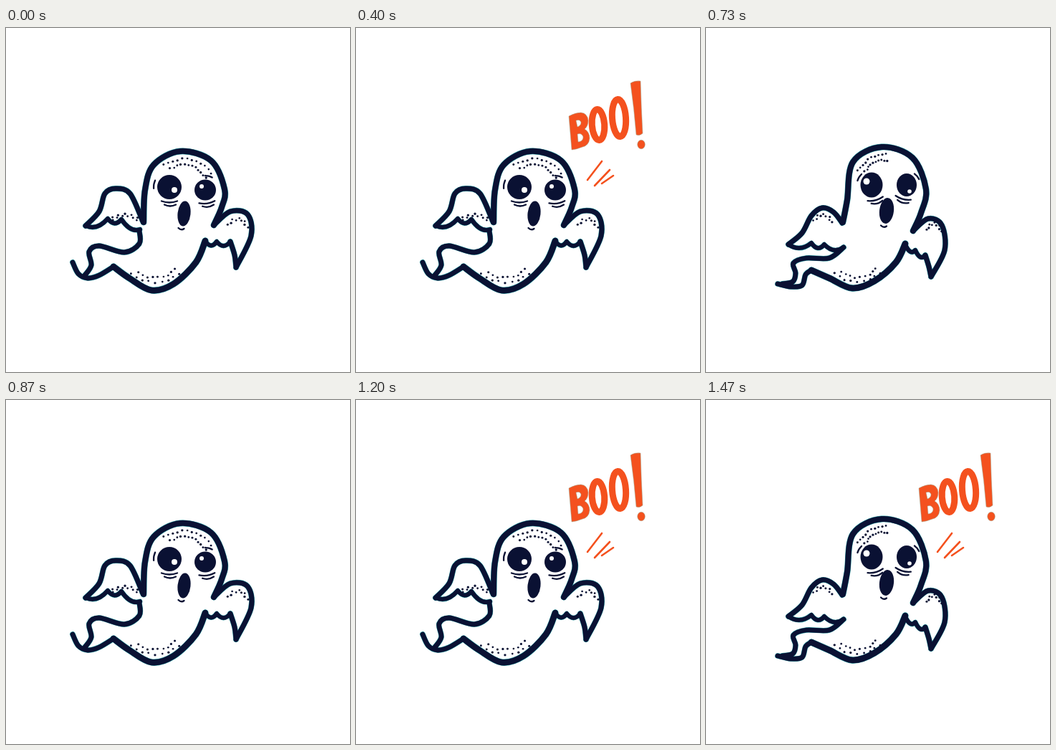
Animation, 480 px wide and 480 px high, one loop 1790 ms. Source, as an HTML page:

```html
<!DOCTYPE html>
<html lang="en">
<head>
<meta charset="utf-8">
<title>Boo</title>
<style>
  html, body { margin: 0; width: 100%; height: 100%; overflow: hidden; background: #fff; }
  svg { display: block; width: 100vw; height: 100vh; }
</style>
</head>
<body>
<svg id="stage" viewBox="0 0 480 480">
  <g id="boo" fill="#f4511e" fill-rule="evenodd" stroke="#9aa68e" stroke-width=".5" role="img" aria-label="BOO!">
    <path d="M297 123Q306 118 314 118Q323 119 324 129Q324 137 319 141Q326 145 326 154Q325 164 316 166Q309 169 301 170Z
             M307 129L309 138Q314 136 314 132Q313 127 307 129Z M309 148L310 159Q317 158 317 152Q315 146 309 148Z"/>
    <path d="M383 77Q389 73 397 74Q398 112 400 147Q396 151 391 149Q388 112 383 77Z"/>
    <ellipse cx="398" cy="162.5" rx="5.3" ry="6.2"/>
    <g fill="none" stroke="#f4511e">
      <ellipse cx="338" cy="135" rx="8.7" ry="21.5" stroke-width="9" transform="rotate(-4 338 135)"/>
      <ellipse cx="367" cy="125.5" rx="9.5" ry="26" stroke-width="9" transform="rotate(-4 367 125.5)"/>
      <path d="M343 186L323 212M354 198L333 220M359 206L343 217" stroke-width="2.6" stroke-linecap="round"/>
    </g>
  </g>
</svg>
<script>
const NS = 'http://www.w3.org/2000/svg';
const LOOP = 1790, TICK = 200 / 3;
const INK = '#0a1133', FRINGE = '#27a3a8';
const stage = document.getElementById('stage');

function add(parent, tag, attrs) {
  const el = document.createElementNS(NS, tag);
  for (const k in attrs) el.setAttribute(k, attrs[k]);
  return parent.appendChild(el);
}

const points = text => text.split(' ').map(p => p.split(',').map(Number));
const polar = (cx, cy, rx, ry, deg) => {
  const a = deg * Math.PI / 180;
  return [cx + rx * Math.cos(a), cy + ry * Math.sin(a)];
};

function randomFrom(seed) {
  return () => (seed = (seed * 16807) % 2147483647) / 2147483647;
}

// Smooth curve through key points; "|" marks a sharp corner.
function curve(text) {
  return text.split('|').map(part => {
    const p = points(part);
    let d = 'M' + p[0];
    for (let i = 0; i + 1 < p.length; i++) {
      const a = p[i - 1] || p[i], b = p[i], c = p[i + 1], e = p[i + 2] || c;
      const h1 = b.map((v, k) => v + (c[k] - a[k]) / 6);
      const h2 = c.map((v, k) => v - (e[k] - b[k]) / 6);
      d += `C${h1} ${h2} ${c}`;
    }
    return d;
  }).join('');
}

// Ragged wing hem: one sagging lobe between each pair of cusps.
function hem(text, sag) {
  const p = points(text);
  return p.slice(1).reduce((d, [x, y], i) =>
    `${d}Q${(p[i][0] + x) / 2} ${(p[i][1] + y) / 2 + 2 * sag} ${x} ${y}`, 'M' + p[0]);
}

const poses = [
  {
    head: '192,271 194,226 206,191 243,172 286,185 305,225 301,250 290,275',
    belly: '278,297 265,327 234,357 203,366 172,349 150,333',
    tail: '150,333 130,345 114,349 101,343 93,327|110,345 119,331 116,312 130,304 165,313 186,301 186,283',
    wings: '111,276 130,256 138,231 153,224 173,231 191,270|290,275 313,256 337,260 342,290 321,334|321,334 319,317 313,298',
    hems: ['187,281 161,267 142,266 112,276', '313,298 294,298 278,297'],
    eyes: [
      { x: 228, y: 222, rx: 17, ry: 17, glint: [235, 226, 4], tilt: 0, brow: 190 },
      { x: 278, y: 226, rx: 15, ry: 14.5, glint: [273, 221, 3], tilt: -8, brow: 284 }
    ],
    mouth: [248.5, 259, 9, 17.5, 6],
    stipple: { head: [248, 222, 44, 41, 230, 335, 24], left: [166, 272, 24, 13, 190, 345, 13],
               right: [323, 280, 15, 16, 200, 350, 9], belly: [208, 325, 42, 31, 145, 30, 18] }
  },
  {
    head: '191,271 197,240 205,187 245,166 288,181 307,225 300,258 289,283',
    belly: '278,301 265,327 235,353 204,363 172,349 147,338',
    tail: '147,338 139,344 134,359 118,361 100,357|106,357 121,354 125,342 122,328 140,321 172,321 192,306',
    wings: '115,302 134,286 147,262 162,251 178,257 190,272|289,283 310,266 329,275 333,310 314,347|314,347 311,333 306,317',
    hems: ['192,306 165,302 147,300 115,302', '306,317 292,310 278,302'],
    eyes: [
      { x: 231, y: 219, rx: 15.5, ry: 17.5, glint: [224, 214, 4.5], tilt: -15, brow: 212 },
      { x: 280, y: 219, rx: 14, ry: 16, glint: [284, 228, 2.8], tilt: 15, brow: 320 }
    ],
    mouth: [252, 255, 10, 18, 7],
    stipple: { head: [250, 214, 42, 39, 203, 275, 20], left: [163, 272, 14, 13, 190, 350, 9],
               right: [318, 286, 11, 16, 190, 350, 9], belly: [211, 325, 40, 30, 145, 30, 18] }
  }
];

function drawEye(g, { x, y, rx, ry, glint: [hx, hy, r], tilt, brow }) {
  add(g, 'ellipse', { cx: x, cy: y, rx, ry, fill: INK });
  add(g, 'circle', { cx: hx, cy: hy, r, fill: '#fff' });
  const line = { stroke: INK, 'stroke-width': 2.3 };
  const arc = [-15, 0, 15].map(a => polar(x, y, rx + 5, rx + 5, brow + a).join());
  add(g, 'path', { d: curve(arc.join(' ')), ...line });
  for (const k of [0, 1]) {
    const w = 11 - 3 * k;
    add(g, 'path', {
      d: `M${x - w + k} ${y + ry + 2.5 + 5 * k}q${w} 4 ${2 * w} 0`,
      transform: `rotate(${tilt} ${x} ${y})`, ...line
    });
  }
}

// Dots scattered in two loose rows along an elliptic arc.
function drawDots(g, [cx, cy, rx, ry, from, to, n], random) {
  for (let i = 0; i < n; i++) {
    const depth = 1 - 0.2 * (i % 2) - 0.08 * random();
    const deg = from + (to - from) * (i + 0.4 * random()) / (n - 1);
    const [x, y] = polar(cx, cy, rx * depth, ry * depth, deg);
    add(g, 'circle', { cx: x, cy: y, r: 1.3 + 0.4 * random(), fill: INK });
  }
}

function drawGhost(pose) {
  const g = add(stage, 'g', { fill: 'none', 'stroke-linecap': 'round', 'stroke-linejoin': 'round' });
  const strokes = [
    [8, curve(pose.head)], [8.5, curve(pose.belly)], [6.8, curve(pose.tail)],
    [7, curve(pose.wings)], ...pose.hems.map(h => [6, hem(h, 6)])
  ];
  for (const [stroke, extra] of [[FRINGE, 0.8], [INK, 0]])
    for (const [w, d] of strokes) add(g, 'path', { d, stroke, 'stroke-width': w + extra });

  pose.eyes.forEach(eye => drawEye(g, eye));
  const [cx, cy, rx, ry, turn] = pose.mouth;
  add(g, 'ellipse', { cx, cy, rx, ry, fill: INK, transform: `rotate(${turn} ${cx} ${cy})` });
  add(g, 'path', { d: `M${cx - 8} ${cy + ry + 2.5}q4 4 8 1`, stroke: INK, 'stroke-width': 2.3 });

  const random = randomFrom(31);
  for (const band of Object.values(pose.stipple)) drawDots(g, band, random);
  return g;
}

// Flip an element between hidden and shown at the given ticks.
function blink(el, shown, ticks) {
  const times = ticks.map(n => Math.round(n * TICK / 10) * 10);
  const frames = [0, ...times, LOOP].map((t, i) => ({
    offset: t / LOOP,
    opacity: (i + shown) % 2,
    easing: 'steps(1, end)'
  }));
  el.animate(frames, { duration: LOOP, iterations: Infinity });
}

const every = (step, from, to) =>
  Array.from({ length: (to - from) / step + 1 }, (_, i) => from + i * step);

// The wings beat evenly; the shout stutters, flickers fast, then slows down.
const flaps = every(3, 3, 21);
const shouts = [1, 3, 4, ...every(1, 7, 13), ...every(3, 16, 22)];

poses.forEach((pose, i) => blink(drawGhost(pose), 1 - i, flaps));
blink(document.getElementById('boo'), 0, shouts);
</script>
</body>
</html>
```
